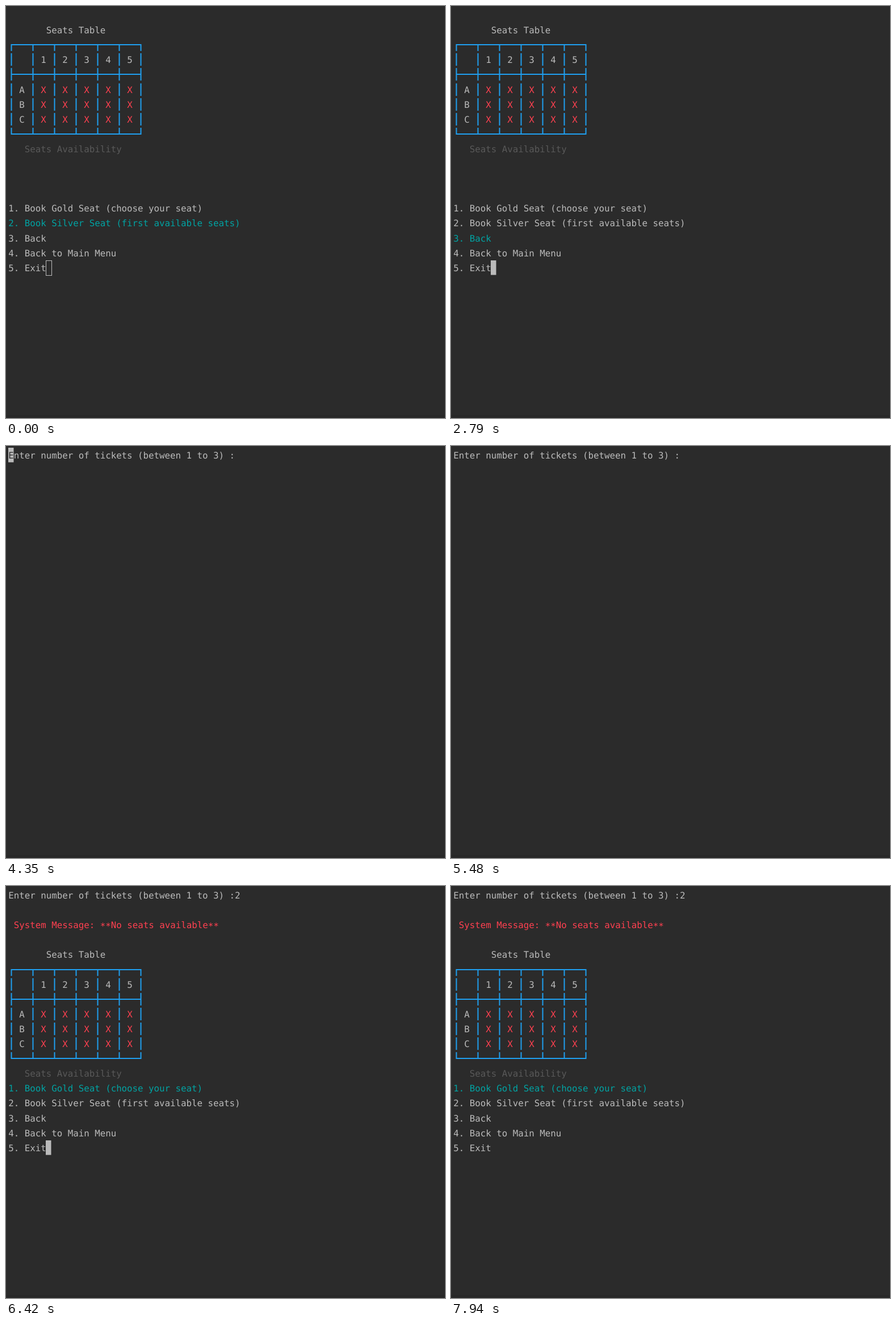
An HTML page for the animation above (8 s loop, 773 by 724 pixels).

```html
<!DOCTYPE html>
<html lang="en">
<head>
<meta charset="utf-8">
<title>Seat booking terminal</title>
<style>
  html, body { margin: 0; width: 100%; height: 100%; overflow: hidden; background: #2b2b2b; }
  svg { display: block; width: 773px; height: 724px; }
  text {
    font: 15.78px "DejaVu Sans Mono", "Noto Sans Mono", monospace;
    font-variant-ligatures: none;
    text-rendering: geometricPrecision;
    white-space: pre;
  }
</style>
</head>
<body>
<svg id="stage" viewBox="0 0 773 724"></svg>
<script>
const LOOP = 8000;
const COL = 9.5, ROW = 26.1, LEFT = 4, TOP = 3;
const BG = '#2b2b2b', FG = '#bbbbbb', CYAN = '#00a3a3', RED = '#ff4050', BLUE = '#1f9ff0', DIM = '#595959';
const PROMPT = 'Enter number of tickets (between 1 to 3) :';
const MENU = [
  'Book Gold Seat (choose your seat)',
  'Book Silver Seat (first available seats)',
  'Back',
  'Back to Main Menu',
  'Exit'
];
const MENU_ROW = 13;
const EXIT_END = [7, 17];

// Each step: start time, screen, selected item or typed text, cursor cell, cursor style
const STEPS = [
  { at: 0, screen: 'menu', pick: 1, cell: EXIT_END, hollow: true },
  { at: 1330, screen: 'menu', pick: 1, cell: EXIT_END },
  { at: 2320, screen: 'menu', pick: 1 },
  { at: 2790, screen: 'menu', pick: 2, cell: EXIT_END },
  { at: 3220, screen: 'menu', pick: 1 },
  { at: 3290, screen: 'menu', pick: 1, cell: EXIT_END },
  { at: 4350, screen: 'prompt', typed: '', cell: [0, 0] },
  { at: 4410, screen: 'prompt', typed: '', cell: [42, 0] },
  { at: 5480, screen: 'prompt', typed: '' },
  { at: 5610, screen: 'prompt', typed: '2', cell: [43, 0] },
  { at: 6420, screen: 'result', pick: 0, cell: EXIT_END },
  { at: 6950, screen: 'result', pick: 0 },
  { at: 7410, screen: 'result', pick: 0, cell: EXIT_END },
  { at: 7940, screen: 'result', pick: 0 }
];

const xOf = col => LEFT + col * COL;
const yOf = row => Math.round(TOP + row * ROW);

function text(col, row, str, fill = FG, dy = 0) {
  return `<text x="${xOf(col) + .3}" y="${yOf(row) + 19 + dy}" fill="${fill}">${str}</text>`;
}

function rect(x, y, w, h, attrs) {
  return `<rect x="${x}" y="${y}" width="${w}" height="${h}" ${attrs}/>`;
}

function grid(row) {
  const mid = r => yOf(r) + 13;
  let d = '';
  for (const r of [0, 2, 6]) d += `M8.5 ${mid(row + r)}H238.5`;
  // Row glyphs are shorter than the line pitch, which leaves small gaps
  for (let c = 0; c < 7; c++) {
    for (let r = 0; r < 7; r++) {
      const y = mid(row + r);
      d += `M${9.5 + c * 38} ${r ? y - 11 : y}V${r < 6 ? y + 11 : y}`;
    }
  }
  return `<path d="${d}" fill="none" stroke="${BLUE}" stroke-width="2"/>`;
}

function table(row) {
  let out = text(7, row, 'Seats Table') + grid(row + 1);
  for (let c = 0; c < 5; c++) {
    const col = 6 + c * 4;
    out += text(col, row + 2, c + 1);
    for (let r = 0; r < 3; r++) out += text(col, row + 4 + r, 'X', RED);
  }
  [...'ABC'].forEach((name, r) => { out += text(2, row + 4 + r, name); });
  return out + text(3, row + 8, 'Seats Availability', DIM);
}

function menu(pick) {
  return MENU.map((label, i) =>
    text(0, MENU_ROW + i, `${i + 1}. ${label}`, i === pick ? CYAN : FG)).join('');
}

function message() {
  return text(1, 2, 'System Message:', RED) + text(17, 2, '**', RED, 2) +
    text(19, 2, 'No seats available', RED) + text(37, 2, '**', RED, 2);
}

const SCREENS = {
  menu: s => table(1) + menu(s.pick),
  prompt: s => text(0, 0, PROMPT + s.typed),
  result: s => text(0, 0, PROMPT + '2') + message() + table(4) + menu(s.pick)
};

function cursor({ cell, hollow, screen }) {
  if (!cell) return '';
  const [col, row] = cell;
  const x = Math.floor(xOf(col)), y = yOf(row);
  if (hollow) return rect(x + .5, y + .5, 10, 26, `fill="none" stroke="${FG}"`);
  const under = screen === 'prompt' ? PROMPT[col] || '' : '';
  return rect(x, y, COL, 25.6, `fill="${FG}"`) + text(col, row, under, BG);
}

const stage = document.getElementById('stage');
const backdrop = rect(0, 0, 773, 724, `fill="${BG}"`) +
  rect(0, 719, 773, 5, 'fill="#282828"') + rect(772, 0, 1, 724, 'fill="#282828"');
let shown = null;

function draw(t) {
  const step = STEPS.findLast(s => s.at <= t);
  if (step === shown) return;
  shown = step;
  stage.innerHTML = backdrop + SCREENS[step.screen](step) + cursor(step);
}

const start = performance.now();
function tick() {
  draw((performance.now() - start) % LOOP);
  requestAnimationFrame(tick);
}
tick();
</script>
</body>
</html>
```
